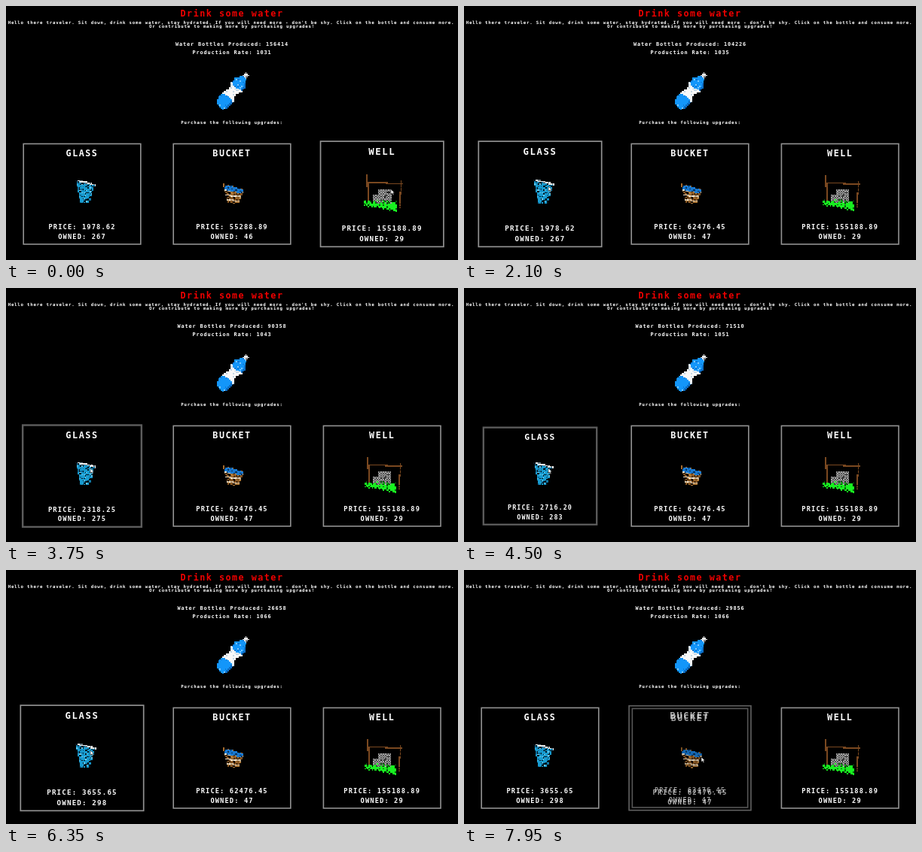
These frames come from a looping animation (600 px wide and 338 px high, 8 s). An HTML page:

```html
<!DOCTYPE html>
<html lang="en">
<head>
<meta charset="utf-8">
<title>Drink some water</title>
<style>
  html, body { margin: 0; width: 100%; height: 100%; overflow: hidden; background: #000; }
  svg { display: block; width: 100vw; height: 100vh; background: #000; }
  text { font: bold 6.84px "DejaVu Sans Mono", monospace; letter-spacing: .13em; fill: #fff; text-anchor: middle; white-space: pre; }
  .title { font-size: 11.7px; }
  .red { fill: #f00000; }
  .small { font-size: 5.79px; }
  .label { font-size: 8.7px; }
  .frame { fill: #000; stroke: #929292; stroke-width: 1.6; }
  .clicking .frame { stroke: #5c5c5c; stroke-width: 2.4; }
  .sprite { shape-rendering: crispEdges; }
</style>
</head>
<body>
<svg id="stage" viewBox="0 0 600 338"></svg>
<script>
const LOOP = 8000, STEP = 50;
const CLICK_START = 3000, CLICK_GAP = 96.5, CLICKS = 31, BUCKET_BUY = 800;
const TICKS = [360, 1025, 1690, 2355, 3030, 3690, 4355, 5020, 5710, 6360, 7030, 7690];
const stage = document.getElementById('stage');

const text = (x, y, cls, body, id = '') =>
  `<text x="${x}" y="${y}" class="${cls}" id="${id}">${body}</text>`;

function random(seed) {
  return () => (seed = (seed * 16807) % 2147483647) / 2147483647;
}

// Fills a box with square cells; colorAt returns a colour or nothing.
function sprite([x0, y0, x1, y1], size, seed, colorAt) {
  const next = random(seed);
  let cells = '';
  for (let y = y0; y < y1; y += size)
    for (let x = x0; x < x1; x += size) {
      const color = colorAt(x, y, next());
      if (color) cells += `<rect x="${x}" y="${y}" width="${size}" height="${size}" fill="${color}"/>`;
    }
  return `<g class="sprite">${cells}</g>`;
}

// The bottle lies along a slanted axis: u runs to the cap, v across.
const bottle = () => sprite([278, 88, 324, 138], 1.8, 71, (x, y, r) => {
  const u = (x - 299.5) * .64 - (y - 113.5) * .77;
  const v = (x - 299.5) * .77 + (y - 113.5) * .64;
  const w = Math.abs(v);
  const blue = v > 6.5 ? '#0c6cc4' : r < .06 ? '#7cc8ff' : r < .16 ? '#0c78d8' : '#1396fa';
  if (u > 25 && u < 32 && w < 3) return r < .3 ? '#8a8a8a' : '#e8e8e8';
  if (u > 7 + w * .25 && u <= 25 && w < Math.min(9, 3 + (25 - u) * .7)) return blue;
  if (u > -8 - w * .2 && u <= 7 + w * .25 && w < 5.5 + Math.abs(u) * .5) return r < .08 ? '#c4d6e4' : '#f8f8f8';
  if (u > -26 && u <= -8 - w * .2 && w < Math.min(9.5, 5 + (u + 26))) return blue;
});

const glass = () => sprite([-9, -20, 18, 14], 1.6, 19, (x, y, r) => {
  const rim = -18.5 + (x + 6) * .24;
  if (x > -7 && Math.abs(y - rim) < 1.2) return r < .25 ? '#6d7c84' : '#eeeeee';
  const left = -9 + (y + 18) * .2, right = 16 - (y + 14) * .27;
  if (y < rim - (x < -4 ? 0 : 1) || y > 12 - Math.abs(x - 3) * .2 || x < left || x > right) return;
  if (Math.sin(x * .55 + y * .7) > .7 + r * .4 || r < .14) return '#03141c';
  return r < .35 ? '#0f6c98' : r < .43 ? '#6ccbee' : '#179bd0';
});

const bucket = () => sprite([-12, -14, 16, 13], 1.6, 43, (x, y, r) => {
  const rim = ((x - 1.5) / 13.5) ** 2 + ((y + 7.2 - x * .18) / 3.6) ** 2;
  if (rim < 1) return r < .15 ? '#0a3157' : '#1878d0';
  const left = -12 + (y + 10) * .27, right = 15 - (y + 6) * .38;
  if (y < -11 + x * .25 || y > 12 - Math.abs(x - 1) * .25 || x < left || x > right) return;
  if (y < -6 + x * .15) return r < .5 ? '#a56b2c' : null;
  const band = Math.sin((y - x * .12) * 1.05);
  if (band > .55) return r < .4 ? '#f0e4d0' : '#c3ab88';
  return r < .22 ? '#120a04' : r < .5 ? '#b07a38' : '#80501f';
});

const well = () => sprite([-23, -25, 26, 23], 1.6, 87, (x, y, r) => {
  const grassTop = 9 + x * .1 + (r - .5) * 6, grassEnd = 17.5 + x * .2 + (r - .5) * 3;
  if (x < 18 && y > grassTop && y < grassEnd) return r < .15 ? '#0a5c0e' : '#18f020';
  const beam = -15.8 + (x + 19) * .05;
  if (Math.abs(y - beam) < .9 && x > -19) return '#7a4820';
  const lean = y * .06;
  if (Math.abs(x + 18.6 - lean * .5) < .9 && y < 10) return '#7a4820';
  if (Math.abs(x - 22.5 + lean) < .9 && y > -18 && y < 18) return r < .15 ? '#301b0a' : '#7a4820';
  const checker = (Math.round((x + 23) / 1.6) + Math.round((y + 25) / 1.6)) % 2;
  if (x > -13 && x < 12 && y > (x < -6 ? 0 : -6) && y < 12)
    return r < .12 ? '#1c1c1c' : checker ? '#a2a2a2' : '#585858';
});

const card = (id, name, art) => `<g id="${id}">
  <rect class="frame" x="-77.8" y="-66.8" width="155.6" height="133.6"/>
  ${text(0, -50, 'title', name)}${art()}
  ${text(0, 46.8, 'label', '', id + 'Price')}${text(0, 59.4, 'label', '', id + 'Owned')}</g>`;

stage.innerHTML =
  text(300, 13.8, 'title red', 'Drink some water') +
  text(299, 24.2, 'small', "Hello there traveler. Sit down, drink some water, stay hydrated. If you will need more - don't be shy. Click on the bottle and consume more.") +
  text(300, 29, 'small', 'Or contribute to making more by purchasing upgrades!') +
  text(300, 53.4, '', '', 'produced') + text(300, 63.7, '', '', 'rate') +
  bottle() + text(300, 157, 'small', 'Purchase the following upgrades:') +
  card('glass', 'GLASS', glass) + card('ghost', 'BUCKET', bucket) +
  card('bucket', 'BUCKET', bucket) + card('well', 'WELL', well) +
  '<path id="cursor" d="M0 0V6.5L1.6 5 2.8 7.4 3.8 6.9 2.8 4.6H4.8Z" fill="#fff" stroke="#000" stroke-width=".5"/>';

const el = {};
stage.querySelectorAll('[id]').forEach(node => { if (node.id) el[node.id] = node; });

const ease = (t, from, span = 150) => {
  const k = Math.min(1, Math.max(0, (t - from) / span));
  return k * k * (3 - 2 * k);
};
const hover = (t, from, to) => ease(t, from) - ease(t, to);

const glassBought = t => t < CLICK_START ? 0 : Math.min(CLICKS, Math.floor((t - CLICK_START) / CLICK_GAP) + 1);
const bucketBought = t => t >= BUCKET_BUY ? 1 : 0;
const rateAt = t => 1031 + 4 * bucketBought(t) + glassBought(t);

function economy(t) {
  let cents = 197862, spent = bucketBought(t) * 5528889;
  for (let i = glassBought(t); i > 0; i--) {
    spent += cents;
    cents = Math.round(cents * 102 / 100);
  }
  const earned = TICKS.filter(tick => tick <= t).reduce((sum, tick) => sum + rateAt(tick), 0);
  return { price: cents / 100, produced: Math.floor(156414.4 - spent / 100 + earned) };
}

const isClicking = t => t >= CLICK_START && t < CLICK_START + (CLICKS - 1) * CLICK_GAP;

// Each click squeezes the hovered card; the squeeze deepens as clicking picks up.
function glassScale(t) {
  const phase = (t - CLICK_START) / CLICK_GAP * 2 * Math.PI;
  const squeeze = isClicking(t) ? .085 * ease(t, 2950, 200) * (1 - Math.cos(phase)) / 2 : 0;
  return 1 + .05 * hover(t, 1750, 7225) - squeeze;
}

function place(node, x, scale) {
  node.setAttribute('transform', `translate(${x} 250.2) scale(${scale})`);
}

function label(id, price, owned) {
  el[id + 'Price'].textContent = 'PRICE: ' + price.toFixed(2);
  el[id + 'Owned'].textContent = 'OWNED: ' + owned;
}

function moveCursor(t) {
  const stops = [[511, 244], [312, 250], [112, 240], [315, 249]];
  const moves = [ease(t, 150, 300), ease(t, 1450, 350), ease(t, 6950, 250)];
  let [x, y] = stops[0];
  moves.forEach((k, i) => {
    x += (stops[i + 1][0] - stops[i][0]) * k;
    y += (stops[i + 1][1] - stops[i][1]) * k;
  });
  el.cursor.setAttribute('transform', `translate(${x} ${y})`);
}

function draw(t) {
  const { price, produced } = economy(t);
  const bought = bucketBought(t), pressed = t >= 7950;
  const bucketPrice = bought ? 62476.45 : 55288.89;
  el.produced.textContent = 'Water Bottles Produced: ' + produced;
  el.rate.textContent = 'Production Rate: ' + rateAt(t);
  label('glass', price, 267 + glassBought(t));
  label('bucket', bucketPrice, 46 + bought);
  label('ghost', bucketPrice, 46 + bought);
  label('well', 155188.89, 29);

  place(el.glass, 101, glassScale(t));
  place(el.bucket, 300, pressed ? .985 : 1 + .05 * (hover(t, 350, 1500) + ease(t, 7250)));
  place(el.ghost, 300, 1.04);
  place(el.well, 499.2, 1.05 - .05 * ease(t, 200));
  el.glass.classList.toggle('clicking', isClicking(t));
  el.ghost.style.display = pressed ? '' : 'none';
  el.ghost.style.opacity = pressed ? .65 : 1;
  el.bucket.style.opacity = pressed ? .6 : 1;
  el.bucket.querySelector('.frame').style.fill = pressed ? 'none' : '';
  moveCursor(t);
}

function loop() {
  draw(Math.floor(performance.now() % LOOP / STEP) * STEP);
  requestAnimationFrame(loop);
}
loop();
</script>
</body>
</html>
```
